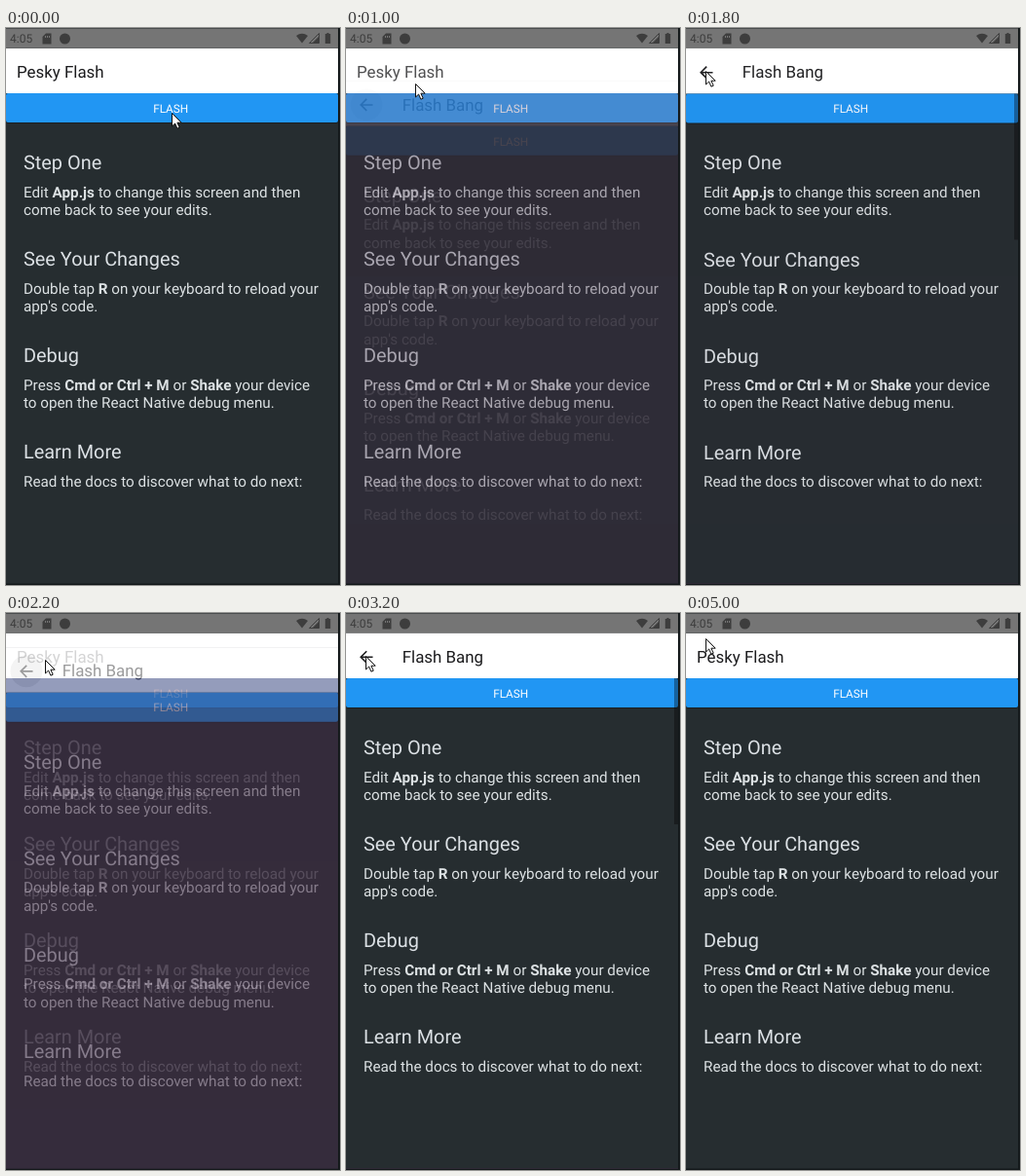
An HTML page that plays this animation: 343x572 px, repeating every 5.2 s.

```html
<!DOCTYPE html>
<html lang="en">
<head>
<meta charset="utf-8">
<title>Pesky Flash</title>
<style>
  html, body { margin: 0; width: 100%; height: 100%; overflow: hidden; background: #14191b; }
  svg { display: block; width: 343px; height: 572px; font-family: Roboto, sans-serif; text-rendering: geometricPrecision; }
  .title { font-size: 16.9px; fill: #1c1c1e; }
  .head { font-size: 19.9px; fill: #dce1e5; }
  .body { font-size: 15.24px; fill: #dce1e3; }
  .body tspan { font-weight: 700; }
  .button { font-size: 11.8px; fill: #fff; text-anchor: middle; }
</style>
</head>
<body>
<svg viewBox="0 0 343 572">
  <defs>
    <clipPath id="view"><rect y="20.5" width="341" height="550"/></clipPath>
  </defs>
  <g clip-path="url(#view)">
    <g id="home"></g>
    <g id="flash" opacity="0">
      <rect y="20.5" width="341" height="46.5" fill="#fff"/>
      <rect y="67" width="341" height="504" fill="#502c50"/>
    </g>
    <g id="card"></g>
  </g>
  <g id="status">
    <rect width="341" height="20.5" fill="#757575"/>
    <rect width="341" height="1" fill="#4a4d4e"/>
    <g fill="#3d3d3d">
      <text x="4" y="15.2" font-size="12">4:05</text>
      <path d="M41 5.5h5.5v11h-9v-7.5z"/>
      <path d="M40.5 8v2M42.5 8v2M44.5 8v2" stroke="#757575"/>
      <circle cx="60.5" cy="11" r="5.5"/>
      <path d="M298 8q6-4.5 12 0l-6 7.5z"/>
      <path d="M321.5 5.5v10h-10z" fill="none" stroke="#3d3d3d"/>
      <path d="M321.5 8.5v7h-7z"/>
      <path d="M329.5 5h2v1h1.7v10h-5.4v-10h1.7z"/>
    </g>
  </g>
  <path id="cursor" d="M.5.5v13.5l3.1-3 2.3 5.2 2.3-1-2.3-5h4.3z" fill="#fff" stroke="#111"/>
</svg>
<script>
const LOOP = 5200, STEP = 100;
const OPEN = 350, CLOSE = 150, DROP = 44, MOVE = 225;
const $ = id => document.getElementById(id);

const sections = [
  ['Step One', 'Edit <tspan>App.js</tspan> to change this screen and then', 'come back to see your edits.'],
  ['See Your Changes', 'Double tap <tspan>R</tspan> on your keyboard to reload your', "app's code."],
  ['Debug', 'Press <tspan>Cmd or Ctrl + M</tspan> or <tspan>Shake</tspan> your device', 'to open the React Native debug menu.'],
  ['Learn More', 'Read the docs to discover what to do next:']
];

const text = (cls, x, y, s) => `<text class="${cls}" x="${x}" y="${y}">${s}</text>`;

function screen(title, x, extra = '') {
  const copy = sections.map(([head, ...lines], i) => {
    const y = 145 + i * 99.1;
    return text('head', 18, y, head) +
      lines.map((s, j) => text('body', 18, y + 28.6 + j * 18.2, s)).join('');
  }).join('');
  return `<rect y="20.5" width="341" height="552" fill="#262d30"/>
    <rect y="20.5" width="341" height="46.5" fill="#fff"/>
    <rect y="68" width="341" height="30" rx="2" fill="#192023"/>
    <rect y="67" width="341" height="30" rx="2" fill="#2196f3"/>` +
    text('title', x, 50.8, title) + text('button', 169.2, 86.8, 'FLASH') + copy + extra;
}

$('home').innerHTML = screen('Pesky Flash', 11);
$('card').innerHTML = screen('Flash Bang', 57.7, `
  <circle id="ripple" cx="21" cy="45" r="16.5" opacity="0"/>
  <path d="M27.5 45.2H15.5M21.2 39.2l-6 6 6 6" fill="none" stroke="#1c1c1e" stroke-width="1.6"/>
  <rect id="bar" x="337" y="67" width="4" height="150" opacity="0"/>`);

const FLASH = { x: 170, y: 87 }, BACK = { x: 20, y: 44 };

// Each visit opens the card, closes it, then leaves the cursor at rest.
const visits = [
  { open: 337, close: 885, rest: { x: 96, y: 75 } },
  { open: 1592, close: 2150, rest: { x: 100, y: 73 } },
  { open: 2922, close: 3560, rest: { x: 20, y: 26 } }
];

const clamp = v => Math.min(1, Math.max(0, v));
const mix = (a, b, k) => a + (b - a) * k;
const easeOut = (k, power) => 1 - (1 - clamp(k)) ** power;

function cursorAt(t) {
  let { x, y } = FLASH;
  const move = (to, from) => {
    const k = clamp((t - from) / MOVE);
    x = mix(x, to.x, easeOut(k, 2));
    y = mix(y, to.y, k);
  };
  for (const { open, close, rest } of visits) {
    move(BACK, open - 17);
    move(rest, close + 20);
  }
  return [Math.round(x), Math.round(y)];
}

const fade = p =>
  p < .5 ? p / 2 :
  p < .9 ? mix(.25, .7, (p - .5) / .4) :
  mix(.7, 1, (p - .9) / .1);

function draw(t) {
  let p = 0, bar = 0, ripple = 0;
  const visit = visits.find(v => t >= v.open && t < v.close + CLOSE);
  if (visit) {
    const age = t - visit.open, left = t - visit.close;
    p = left < 0 ? easeOut(age / OPEN, 5) : 1 - left / CLOSE;
    bar = .35 * (1 - clamp((age - 280) / 100));
    ripple = left > -90 ? .1 : 0;
  }
  $('card').setAttribute('opacity', fade(p));
  $('card').setAttribute('transform', `translate(0 ${DROP * (1 - p)})`);
  $('flash').setAttribute('opacity', p);
  $('bar').setAttribute('opacity', bar);
  $('ripple').setAttribute('opacity', ripple);
  $('cursor').setAttribute('transform', `translate(${cursorAt(t)})`);
}

const start = performance.now();
function tick() {
  const t = (performance.now() - start) % LOOP;
  draw(Math.floor(t / STEP) * STEP);
  requestAnimationFrame(tick);
}
tick();
</script>
</body>
</html>
```
